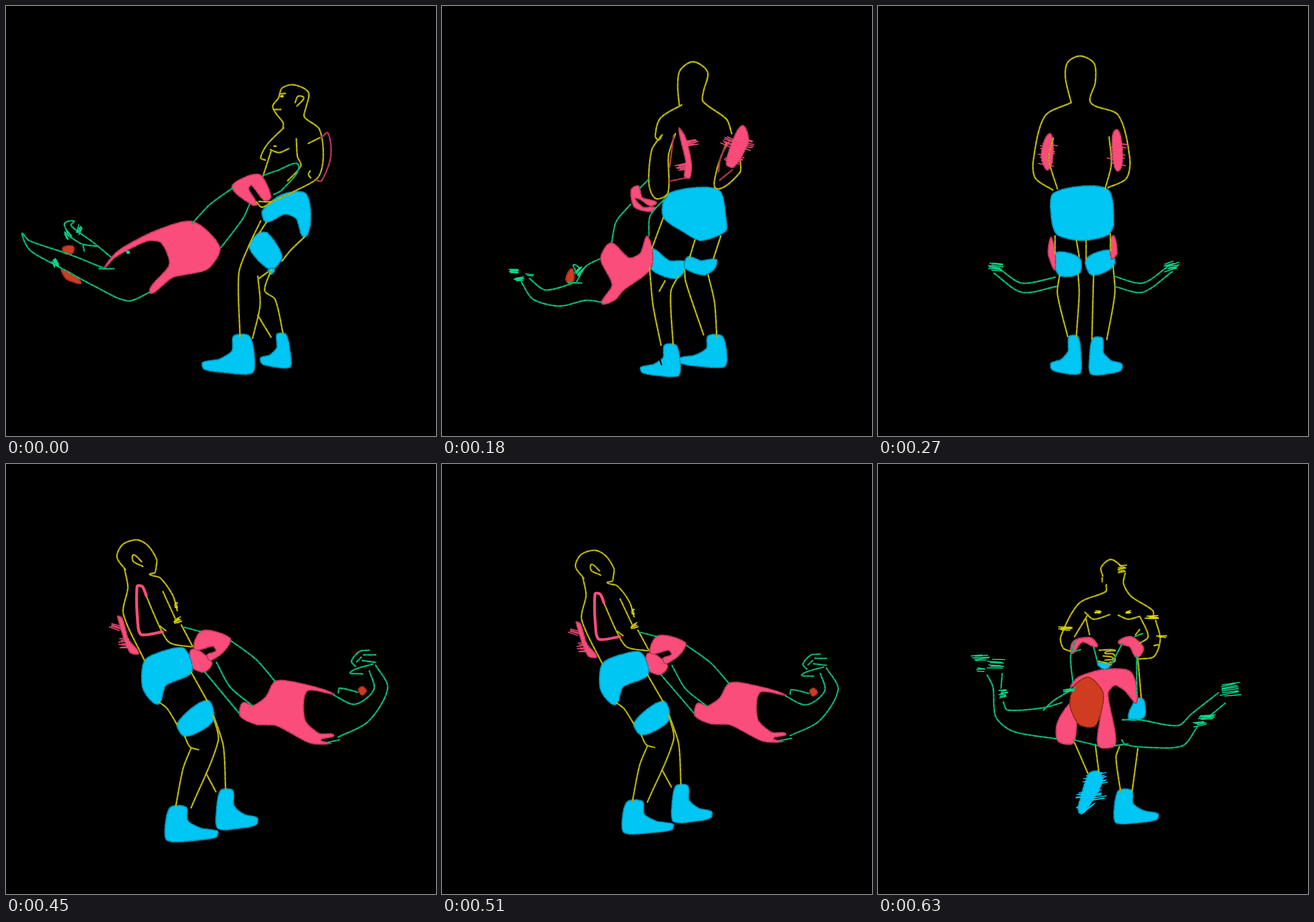
An HTML page with a canvas for the animation above (0.69 s loop, 748x748 px).

```html
<!DOCTYPE html>
<html lang="en">
<head>
<meta charset="utf-8">
<title>Giant swing</title>
<style>
html, body { margin: 0; width: 100%; height: 100%; overflow: hidden; background: #000; }
canvas { display: block; width: 100vw; height: 100vh; }
</style>
</head>
<body>
<canvas id="stage" width="748" height="748"></canvas>
<script>
const ctx = document.getElementById("stage").getContext("2d");

const YELLOW = { base: "#a39f08", light: "#c9c414", hatch: "#e0da00" };
const GREEN = { base: "#079a62", light: "#16c786", hatch: "#0fd78a" };
const WINE = { base: "#a4304f", light: "#c23b60" };
const GAP = { base: "#000", light: "#000" };
const PINK = { base: "#fb4d7b", light: "#fb4d7b", hatch: "#f24b77" };
const BLUE = { base: "#00c6f3", hatch: "#00c6f3" };
const RED = { base: "#d03c20" };

const pointsOf = text => text.trim().split(" ").map(p => p.split(",").map(Number));

// Smooth curve through the points; handles scale with each segment.
function curve(pts, closed) {
  const path = new Path2D(), n = pts.length, round = closed ? 0.24 : 0.28;
  const at = i => pts[closed ? (i + n) % n : Math.max(0, Math.min(n - 1, i))];
  const slope = i => {
    const [ax, ay] = at(i - 1), [bx, by] = at(i + 1);
    const len = Math.hypot(bx - ax, by - ay) || 1;
    return [(bx - ax) / len, (by - ay) / len];
  };
  path.moveTo(...at(0));
  for (let i = 0; i < (closed ? n : n - 1); i++) {
    const [ax, ay] = at(i), [bx, by] = at(i + 1);
    const [ux, uy] = slope(i), [vx, vy] = slope(i + 1);
    const h = round * Math.hypot(bx - ax, by - ay);
    path.bezierCurveTo(ax + ux * h, ay + uy * h, bx - vx * h, by - vy * h, bx, by);
  }
  if (closed) path.closePath();
  return path;
}

function trace(path, color, width, dash = []) {
  ctx.strokeStyle = color;
  ctx.lineWidth = width;
  ctx.setLineDash(dash);
  ctx.stroke(path);
}

function ink(color, text, width = 2.8) {
  for (const part of text.split("/")) {
    const path = curve(pointsOf(part), false);
    trace(path, color.base, width);
    trace(path, color.light, width / 2, [3, 5, 6, 4]);
  }
}

function solid(color, pts) {
  const path = curve(pts, true);
  ctx.fillStyle = color.base;
  ctx.fill(path);
  trace(path, color.base, 2);
  trace(path, "rgba(0,0,0,.3)", 2, [9, 2, 4, 3]);
}

const fill = (color, text) => text.split("/").forEach(part => solid(color, pointsOf(part)));

// A boot in the box x, y, w, h; dir 1 points the toe right, -1 left.
const BOOT = pointsOf(".1,0 .4,0 .43,.4 .68,.63 1,.72 .97,.9 .6,.99 .04,1 0,.55");
function boot(x, y, w, h, dir, tilt = 0) {
  solid(BLUE, BOOT.map(([u, v]) => [
    x + w * (dir > 0 ? u : 1 - u) + tilt * v,
    y + h * v
  ]));
}

function random(seed) {
  return () => (seed = seed * 16807 % 2147483647) / 2147483647;
}

function scribble(color, x, y, len, spread, count, angle = 0) {
  const rnd = random(x * 761 + y * 13 + 1);
  ctx.save();
  ctx.translate(x, y);
  ctx.rotate(angle * Math.PI / 180);
  for (let i = 0; i < count; i++) {
    const v = ((i + 0.5) / count - 0.5) * spread;
    const half = len * (0.3 + 0.2 * rnd()), mid = (rnd() - 0.5) * len * 0.3;
    const path = new Path2D();
    path.moveTo(mid - half, v + rnd() * 2 - 1);
    path.lineTo(mid + half, v + rnd() * 3 - 1.5);
    trace(path, color.hatch, 1.8);
  }
  ctx.restore();
}

function farLeft() {
  fill(BLUE, "446,356 480,328 521,326 530,370 519,402 505,370 485,362 453,376");
  fill(BLUE, "438,396 455,395 480,436 460,458 423,420/456,459 467,457 461,467");
  boot(342, 574, 90, 64, -1);
  boot(440, 571, 52, 57, -1, 4);
  fill(PINK, "170,457 195,426 260,391 325,375 372,420 350,458 290,472 250,498 284,450 270,412 245,409 190,437");
  fill(PINK, "393,315 420,296 443,294 461,332 450,339 427,312 422,318 437,345 428,346");
  fill(RED, "99,420 117,418 116,430 102,431/97,457 131,481 105,475");
  ink(YELLOW, "482,212 482,203 469,186 464,174 474,160 480,143 500,137 526,150 522,176 519,193 545,214 552,262 543,298 508,319 462,340 440,340");
  ink(YELLOW, "503,168 508,157 518,160 506,174/468,180 478,180/476,153 486,152");
  ink(YELLOW, "483,212 455,240 443,264 451,268/461,253 447,296/460,250 475,255 492,248/505,231 507,262 513,278 490,304/526,239 546,229/529,287 526,293 530,299/436,341 445,350 462,341");
  ink(YELLOW, "443,374 422,418 405,465 407,575/453,376 440,396/438,470 442,520 429,578/519,402 495,425 480,444/462,458 450,495 468,510 482,570/438,538 461,576/440,474 455,463");
  ink(WINE, "548,230 560,221 565,262 549,304 540,303");
  ink(GREEN, "447,295 470,287 509,277 480,320 466,328/395,316 355,345 324,378/424,344 412,370 374,420");
  ink(GREEN, "250,498 212,513 155,488 85,450 42,425 28,396 40,408 110,432 170,456/162,457 188,457/105,390 102,378 118,374 113,382 150,410 183,437/112,402 132,414 158,418/134,416 136,426");
  scribble(GREEN, 86, 447, 14, 9, 8, 65);
  scribble(GREEN, 127, 390, 14, 10, 5, 110);
  scribble(GREEN, 107, 398, 14, 9, 6, 60);
  scribble(GREEN, 212, 428, 5, 3, 5);
  scribble(YELLOW, 480, 157, 4, 2, 5);
  scribble(YELLOW, 468, 244, 4, 2, 3);
}

function backLeft() {
  fill(BLUE, "392,327 480,319 494,370 493,392 450,408 420,393 385,367");
  fill(BLUE, "363,422 395,443 424,446 412,473 385,470 362,455/428,436 450,443 477,441 474,457 455,468 422,455");
  boot(346, 590, 68, 53, -1);
  boot(414, 574, 81, 53, -1);
  fill(PINK, "294,412 325,438 345,430 358,401 364,455 315,495 300,512 278,517 296,485 276,440");
  fill(PINK, "342,313 348,333 373,341 363,348 337,334 350,350 370,350 366,358 335,350 329,320");
  fill(PINK, "412,213 424,230 434,275 431,299 422,297 424,270/522,208 533,235 508,280 495,276 500,250");
  fill(RED, "226,457 215,475 222,483 229,479");
  ink(GAP, "378,600 378,612 382,624", 2.5);
  ink(YELLOW, "413,174 410,140 414,112 437,97 462,115 455,148 454,166 495,197 504,222/417,172 380,195 371,226 377,233 383,224/381,226 365,250 360,310 372,335 393,325 394,260 406,222/495,238 478,285 478,318 518,290 519,270");
  ink(YELLOW, "385,368 365,422/361,455 367,520 381,590/440,407 430,440/485,400 472,440/411,470 398,497 402,590/388,478 378,496/422,460 424,480 455,572/463,468 474,515 478,576");
  ink(WINE, "403,225 396,280/394,305 425,299/500,235 485,262 481,288/483,303 505,285");
  ink(GREEN, "360,301 343,318/328,345 303,375 295,412/391,332 362,365 360,400/274,440 250,453 234,480/219,481 243,482/278,515 250,512 205,522 158,510 138,480/232,481 180,494 152,474/232,460 229,450 240,456");
  scribble(GREEN, 126, 461, 16, 5, 6);
  scribble(GREEN, 134, 475, 14, 5, 6);
  scribble(GREEN, 152, 468, 14, 6, 2);
  scribble(GREEN, 238, 461, 16, 10, 7, -50);
  scribble(PINK, 433, 238, 22, 10, 7, -12);
  scribble(PINK, 420, 279, 24, 12, 7, -12);
  scribble(PINK, 501, 237, 28, 18, 6, 20);
  scribble(PINK, 530, 240, 22, 20, 6, 15);
  scribble(PINK, 510, 264, 30, 18, 6, 15);
}

function backView() {
  fill(BLUE, "306,325 398,318 410,378 400,398 355,408 312,398 302,372");
  fill(BLUE, "308,430 350,438 350,465 315,468/362,440 405,425 410,452 372,468");
  boot(301, 575, 52, 64, -1);
  boot(368, 578, 56, 62, 1);
  fill(PINK, "298,222 305,250 296,285 284,260/414,215 425,250 418,287 408,255/302,403 296,430 308,458/408,400 416,430 406,440");
  ink(YELLOW, "336,168 326,125 330,98 352,87 376,100 378,133 370,168 418,190 438,265 432,300 400,316/336,168 290,192 270,270 274,300 304,320/305,230 297,265 312,318/402,228 406,275 395,318");
  ink(YELLOW, "308,400 308,430/345,407 350,436/362,408 362,440/404,396 405,426/316,468 312,500 330,575/348,466 350,500 345,575/375,468 372,580/409,452 412,500 398,580");
  ink(GREEN, "308,472 250,482 212,458/310,488 250,498 202,465/410,470 460,482 502,455/412,488 460,498 512,462");
  scribble(GREEN, 204, 454, 24, 14, 7, 10);
  scribble(GREEN, 510, 452, 24, 14, 7, -15);
  scribble(PINK, 294, 258, 28, 40, 8, 10);
  scribble(PINK, 417, 256, 28, 40, 8, 10);
}

function backRight() {
  fill(PINK, "410,417 430,423 455,397 478,404 482,450 490,470 517,479 480,498 430,465");
  fill(BLUE, "262,328 355,315 356,350 317,411 285,411 262,380");
  fill(BLUE, "292,444 333,433 347,447 345,465 306,475/348,448 401,410 412,430 402,450 361,469");
  fill(BLUE, "318,561 345,578 330,598 362,638 350,644 300,615 284,603/388,583 415,625 408,638 360,628 349,612 370,610 386,624 367,596");
  fill(PINK, "390,293 413,312 395,341 374,335 400,328 397,317 362,328 360,320 392,305");
  fill(PINK, "201,236 218,258 242,305 236,316 207,275/319,197 324,220 308,270 300,283 295,265");
  ink(YELLOW, "248,180 246,163 234,130 245,111 272,107 286,125 291,165 286,172 325,181 337,192/248,180 235,203 210,238/225,250 250,290 261,330/214,315 225,333 262,337/322,208 340,255 360,278/354,275 343,295 356,318 379,285 377,262/372,245 360,222/318,205 305,225 287,232");
  ink(YELLOW, "357,338 380,362 401,411/318,411 348,447/271,404 292,442/308,476 335,533/345,450 350,490 345,497/363,465 374,482 345,515 320,560/411,440 405,500 340,573/374,535 387,588/348,562 370,594 387,592/351,487 356,495");
  ink(WINE, "236,316 253,308/300,281 345,290");
  ink(GREEN, "376,289 390,294/368,328 383,345 382,363/414,322 440,348 455,396/470,402 500,412 522,430/510,432 522,428 550,396/518,478 545,450 572,424/430,470 425,490/417,503 440,507 478,497/420,495 445,477/512,398 540,386 575,381");
  scribble(GREEN, 580, 403, 32, 26, 9, 48);
  scribble(GREEN, 518, 404, 28, 7, 5, -22);
  scribble(GREEN, 538, 412, 14, 8, 4, 20);
  scribble(GREEN, 580, 386, 36, 8, 4, 20);
  scribble(YELLOW, 348, 211, 16, 10, 7, 10);
  scribble(YELLOW, 376, 257, 16, 14, 8, 8);
  scribble(PINK, 207, 268, 36, 44, 13, 8);
  scribble(PINK, 226, 304, 36, 16, 6, 8);
  scribble(PINK, 314, 248, 34, 60, 13, -5);
}

function farRight() {
  fill(PINK, "468,378 500,379 570,400 524,395 520,445 545,469 570,472 548,480 565,486 528,485 470,455 435,453 407,438 412,415 430,420 452,405");
  fill(PINK, "324,322 358,345 345,362 322,352/341,290 390,303 380,325 355,342 350,332 365,325 360,317 328,322");
  fill(PINK, "194,265 202,268 213,305 231,329 215,327");
  fill(BLUE, "241,342 275,325 310,321 323,362 278,385 264,418 238,390/350,411 360,447 312,474 298,451");
  boot(277, 597, 91, 58, 1);
  boot(366, 568, 71, 66, 1);
  fill(RED, "613,392 620,387 627,395 619,402");
  ink(YELLOW, "208,184 193,162 203,140 228,132 247,142 262,166 261,180 259,189 250,192 268,198 290,228 298,255/206,182 212,215 204,260 241,342/238,178 221,169 222,158 236,170/273,222 294,268/245,232 268,285 285,311 322,318/305,280 325,318/268,282 278,290");
  ink(YELLOW, "266,414 280,425 298,454/322,362 350,412/311,474 320,492 335,497/322,494 308,530 295,597/360,437 369,482 322,598/362,440 378,490 382,565/348,538 365,570");
  ink(PINK, "244,229 237,213 228,213 230,285 236,297 272,292", 5);
  ink(GREEN, "310,284 340,292/392,308 435,340 468,378/366,345 390,388 428,420/346,362 405,433/578,398 580,390 612,397/570,402 607,418 640,392 632,360/643,350 664,390 630,448 578,475/560,484 580,480");
  ink(GREEN, "638,348 599,362 620,365/608,352 601,343 615,326 632,324/620,342 643,345/622,332 643,332/610,344 618,336");
  scribble(YELLOW, 299, 273, 12, 8, 5, -25);
  scribble(YELLOW, 296, 245, 5, 12, 5);
  scribble(PINK, 206, 312, 20, 20, 7);
  scribble(PINK, 192, 284, 20, 8, 4, 20);
}

function frontRight() {
  fill(PINK, "442,362 490,368 527,389 512,392 532,440 510,480 545,480 555,445 572,442 560,487 480,485 440,465 412,432 450,460 505,468 508,410 490,385");
  fill(PINK, "318,298 345,292 373,303 352,304 346,332 328,330/398,325 420,306 437,316 405,332/299,290 312,294");
  fill(BLUE, "307,336 345,333 370,390 360,400 337,370 305,374/309,412 335,403 365,405 365,432 318,442");
  fill(BLUE, "318,576 344,575 347,605 372,626 345,627 310,631 308,618 320,605");
  boot(398, 574, 82, 57, 1);
  fill(RED, "553,398 605,376 614,390 614,420 570,445 550,447 547,425 566,405");
  ink(GAP, "306,620 340,621 372,621", 2.5);
  ink(YELLOW, "324,222 325,200 318,178 340,166 357,182 354,213 347,212/357,213 358,235 395,252 397,275/325,222 288,230 262,280 275,318 340,331/310,258 289,288 330,325/305,275 314,292/308,255 330,269 352,263/368,255 372,268 392,275/389,272 389,305/398,275 415,305/347,200 354,199/351,184 357,182");
  ink(YELLOW, "304,376 312,412/320,442 333,472 318,520 323,575/365,432 360,480 340,575/365,450 396,482 393,510 403,575/423,463 429,500 422,573/362,480 355,495/333,472 340,475");
  ink(WINE, "267,277 256,258 266,253 274,260/484,410 500,409");
  ink(GREEN, "345,333 370,395 420,432 480,460 505,461/361,305 390,325 410,352/353,312 358,318/395,370 385,395 388,418/432,377 420,403 480,413 512,412/450,325 445,335/475,310 464,332/300,290 322,297");
  ink(GREEN, "528,390 575,374 607,377/540,385 540,415 562,410/552,400 565,403/545,455 580,442 625,447 634,455/565,480 640,476 670,425 695,375 688,346 680,380/625,447 662,395 668,354 672,380/682,368 673,384");
  scribble(GREEN, 430, 342, 46, 28, 10, 22);
  scribble(GREEN, 412, 360, 44, 16, 6, 12);
  scribble(GREEN, 448, 355, 42, 20, 7, 28);
  scribble(GREEN, 465, 294, 34, 10, 5, 18);
  scribble(GREEN, 487, 306, 24, 26, 6, -45);
  scribble(GREEN, 485, 322, 22, 8, 4, 25);
  scribble(GREEN, 580, 376, 36, 8, 4, -6);
  scribble(YELLOW, 316, 200, 28, 8, 6, 4);
  scribble(YELLOW, 263, 278, 20, 8, 6, -4);
  scribble(YELLOW, 407, 292, 24, 7, 6, 4);
  scribble(YELLOW, 338, 255, 10, 5, 6, 8);
  scribble(YELLOW, 392, 262, 10, 3, 4);
  scribble(YELLOW, 349, 191, 6, 3, 4);
  scribble(YELLOW, 339, 184, 5, 2, 3);
}

function frontView() {
  fill(BLUE, "382,346 404,348 395,358/450,408 462,410 463,440 436,443/367,538 385,535 390,555 360,605 350,607 350,590");
  boot(411, 568, 76, 56, 1);
  fill(PINK, "335,388 350,370 395,357 440,362 450,415 430,395 412,385 400,400 413,488 383,490 387,420 350,380/337,414 312,450 313,482 340,485 345,430");
  fill(PINK, "337,330 340,308 370,302 381,318 355,310/418,310 440,300 462,320 450,337 438,318");
  fill(RED, "334,420 342,385 367,371 392,400 378,455 350,453");
  ink(YELLOW, "391,195 388,180 405,166 424,178/390,198 390,205/397,210 396,222 350,242 318,300 322,320 336,326/430,190 427,208 440,230 478,255 479,268/365,262 342,300/362,270 368,297/360,258 375,270 403,262/418,263 435,270 455,265/483,272 491,305 480,335 455,339/456,266 470,300 455,312/455,288 448,297");
  ink(YELLOW, "385,324 412,324 395,328 410,331 412,343 403,345/392,334 409,338 395,341/384,343 405,349/452,338 458,408/342,485 365,538/378,488 384,535/420,492 414,510 422,570/452,495 442,570");
  ink(GREEN, "343,308 335,335 339,380/375,318 382,345/405,350 425,312/450,335 450,400/447,300 460,295/342,326 352,323/190,367 200,388 205,440 235,465 310,478/216,365 214,390/218,414 225,428 288,424 320,415/288,428 305,412 343,389");
  ink(GREEN, "341,480 383,490/425,445 455,445 522,455 545,435 592,398/424,480 430,488 470,493 530,490 555,458/412,490 435,487/575,440 604,416");
  scribble(GREEN, 176, 337, 30, 12, 5, -4);
  scribble(GREEN, 206, 348, 30, 18, 6, 4);
  scribble(GREEN, 180, 358, 18, 8, 3);
  scribble(GREEN, 218, 399, 16, 14, 7, -8);
  scribble(GREEN, 332, 394, 22, 6, 4, -12);
  scribble(GREEN, 612, 392, 34, 24, 8, -8);
  scribble(GREEN, 573, 440, 26, 8, 6, -4);
  scribble(GREEN, 560, 452, 24, 10, 4, -10);
  scribble(YELLOW, 425, 182, 15, 12, 6, -10);
  scribble(YELLOW, 328, 286, 22, 5, 5);
  scribble(YELLOW, 477, 267, 20, 6, 7, 4);
  scribble(YELLOW, 493, 300, 18, 2, 2);
  scribble(YELLOW, 483, 316, 8, 2, 2, -10);
  scribble(YELLOW, 382, 258, 10, 4, 5);
  scribble(YELLOW, 435, 258, 8, 4, 5);
  scribble(BLUE, 380, 548, 38, 20, 9, -10);
  scribble(BLUE, 372, 577, 44, 18, 10, -8);
  scribble(BLUE, 360, 594, 28, 18, 8, -35);
}

// The same pose squeezed and moved, for the turns in between.
const shifted = (pose, sx, sy, dx, dy) => () => {
  ctx.setTransform(sx, 0, 0, sy, dx, dy);
  pose();
};

const STEPS = [
  { pose: farLeft, ms: 90 },
  { pose: shifted(farLeft, 0.86, 1.04, 46, -25), ms: 90 },
  { pose: backLeft, ms: 90 },
  { pose: backView, ms: 90 },
  { pose: backRight, ms: 90 },
  { pose: farRight, ms: 60 },
  { pose: shifted(farRight, 0.97, 0.94, 45, 26), ms: 60 },
  { pose: frontRight, ms: 60 },
  { pose: frontView, ms: 60 }
];
const LOOP = STEPS.reduce((sum, s) => sum + s.ms, 0);

function stepAt(t) {
  return STEPS.find(s => (t -= s.ms) < 0);
}

function draw({ pose }) {
  ctx.setTransform(1, 0, 0, 1, 0, 0);
  ctx.fillStyle = "#000";
  ctx.fillRect(0, 0, 748, 748);
  ctx.lineCap = ctx.lineJoin = "round";
  pose();
}

let shown = null;
function tick() {
  const step = stepAt(performance.now() % LOOP);
  if (step !== shown) draw(shown = step);
  requestAnimationFrame(tick);
}
tick();
</script>
</body>
</html>
```
